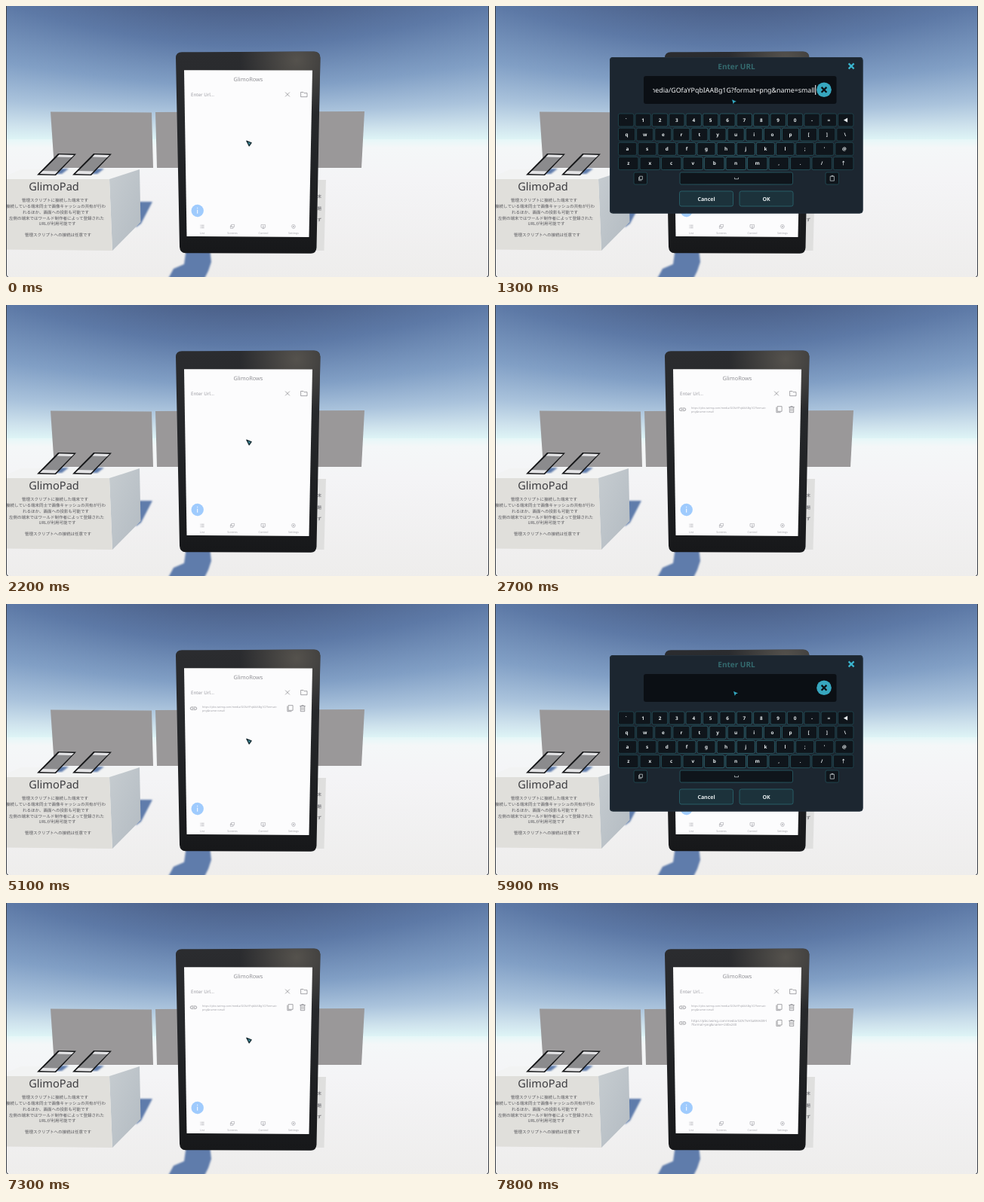
An HTML page that plays this animation: 640x360 px, repeating every 8000 ms.

```html
<!DOCTYPE html>
<html lang="ja">
<head>
<meta charset="utf-8">
<title>Tablet URL entry</title>
<style>
html, body { margin: 0; width: 100%; height: 100%; overflow: hidden; background: #eef0f4; }
svg { display: block; width: 100vw; height: 100vh; }
text { font-family: "Noto Sans", "Noto Sans CJK JP", "Noto Sans CJK", "Open Sans", sans-serif; text-rendering: geometricPrecision; }
.mid { text-anchor: middle; }
.bold { font-weight: 700; fill: #e8eef0; }
.line { fill: none; stroke: #77777c; stroke-width: .65; stroke-linejoin: round; stroke-linecap: round; }
.faint { stroke: #a2a2a8; stroke-width: .6; }
.key { fill: #0f151b; stroke: url(#edge); stroke-width: .9; }
.key.hover { fill: #17232b; stroke: #8cbcc4; }
.btn { fill: #1c323b; stroke: #2a626d; stroke-width: .9; }
.btn.hover { fill: #315a67; stroke: #47808c; }
</style>
</head>
<body>
<svg viewBox="0 0 640 360" preserveAspectRatio="none">
  <defs>
    <linearGradient id="sky" x2="0" y2="1">
      <stop offset="0" stop-color="#4b6089"/>
      <stop offset=".3" stop-color="#5d79a6"/>
      <stop offset=".6" stop-color="#819fc5"/>
      <stop offset=".8" stop-color="#aac3dc"/>
      <stop offset=".93" stop-color="#cfe3ed"/>
      <stop offset="1" stop-color="#def4f6"/>
    </linearGradient>
    <linearGradient id="ground" x2="0" y2="1">
      <stop offset="0" stop-color="#e6f7f8"/>
      <stop offset=".06" stop-color="#f4f7f8"/>
      <stop offset=".3" stop-color="#f4f4f6"/>
      <stop offset="1" stop-color="#eeedec"/>
    </linearGradient>
    <linearGradient id="body" x2="0" y2="1">
      <stop offset="0" stop-color="#2b2c2f"/>
      <stop offset=".4" stop-color="#25272a"/>
      <stop offset="1" stop-color="#17181a"/>
    </linearGradient>
    <radialGradient id="gloss" gradientUnits="userSpaceOnUse" cx="385" cy="72" r="75">
      <stop offset="0" stop-color="#55524d"/>
      <stop offset="1" stop-color="#55524d" stop-opacity="0"/>
    </radialGradient>
    <linearGradient id="side" x2="1" y2="1">
      <stop offset="0" stop-color="#c6ccd0"/>
      <stop offset="1" stop-color="#b3bbc2"/>
    </linearGradient>
    <radialGradient id="edge" gradientUnits="userSpaceOnUse" cx="322" cy="200" r="150">
      <stop offset="0" stop-color="#2f6b76"/>
      <stop offset="1" stop-color="#1d424b"/>
    </radialGradient>
    <filter id="soft"><feGaussianBlur stdDeviation="1"/></filter>
    <clipPath id="field"><rect x="209" y="98" width="217" height="26"/></clipPath>
  </defs>
  <g id="world"></g>
  <g id="rows"></g>
  <g id="dialog"></g>
  <g id="tip">
    <rect x="118" y="330" width="403.5" height="16.5" rx="3" fill="#4d4d50" opacity=".95"/>
    <text x="122" y="340.8" font-size="6.6" class="bold">Submit Input</text>
  </g>
  <g id="cursor"><path stroke-linejoin="round"/></g>
  <path d="M.5 0V357Q.5 359.5 3 360M639.5 0V357Q639.5 359.5 637 360" fill="none" stroke="#3a3f48"/>
</svg>
<script>
const $ = id => document.getElementById(id);
const poly = (points, fill, more = '') => `<polygon points="${points}" fill="${fill}" ${more}/>`;
const rect = (x, y, w, h, more = '') => `<rect x="${x}" y="${y}" width="${w}" height="${h}" ${more}/>`;
const esc = s => s.replace(/&/g, '&amp;').replace(/</g, '&lt;');
const text = (s, x, y, size, fill, cls = '') =>
  `<text x="${x}" y="${y}" font-size="${size}" ${fill ? `fill="${fill}"` : ''} class="${cls}">${esc(s)}</text>`;
const icon = (d, x, y, cls = '', more = '') => `<path class="line ${cls}" d="${d}" transform="translate(${x} ${y})" ${more}/>`;

const ICON = {
  cross: 'M-2.6-2.6L2.6 2.6M2.6-2.6L-2.6 2.6',
  folder: 'M-4-3h3l1 1.2h4V3.2h-8z',
  link: 'M-.6-1.8h-1.8a1.8 1.8 0 0 0 0 3.6h1.8M.6-1.8h1.8a1.8 1.8 0 0 1 0 3.6h-1.8M-1.7 0h3.4',
  copy: 'M-2-4h5.6v6.6h-5.6zM-3.6-2.6v6.6h5.2',
  bin: 'M-3.4-3h6.8M-1.2-3v-1h2.4v1M-2.7-3v7h5.4v-7M-1-1.2v3.4M1-1.2v3.4',
  list: 'M-.8-1.8h3M-.8 0h3M-.8 1.8h3M-2.2-1.8h.2M-2.2 0h.2M-2.2 1.8h.2',
  screens: 'M-1-2.6h3.6v3h-3.6zM-2.6-.8v3.2h3.6v-2M-2.6-.8h1.6',
  control: 'M-2.6-2.4h5.2v3.6h-5.2zM-1.2 2.6h2.4M0 1.2v1.4M-.6-.6h1.2',
  gear: 'M-1.2-2.3h2.4L2.5 0 1.2 2.3h-2.4L-2.5 0zM-.8 0a.8.8 0 1 0 1.6 0a.8.8 0 1 0-1.6 0',
  board: 'M-2.4-2.8h4.8v6h-4.8zM-1-2.8v-.8h2v.8',
  pages: 'M-1-2.8h3.4v4.2h-3.4zM-2.4-1.4v4.2h3.4'
};

// Lines of equal elevation rise towards the sides of a perspective view.
function skyStrips() {
  const focal = 312, horizon = 177, step = 5;
  let out = '';
  for (let x = 0; x < 640; x += step) {
    const h = horizon * Math.hypot(1, (x + step / 2 - 320) / focal);
    out += rect(x, horizon - h, step, h, 'fill="url(#sky)"');
  }
  return out;
}

function drawWorld() {
  const shadow = points => poly(points, '#5f7cab', 'filter="url(#soft)"');
  const phone = x => shadow(`${x + 24},216 ${x + 42},216 ${x + 33},223 ${x + 17},223`) +
    poly(`${x + 28},196 ${x + 52},196.5 ${x + 25},225 ${x},224.5`, '#151618') +
    poly(`${x + 29.5},197.5 ${x + 49},198 ${x + 24},223.5 ${x + 4},223`, '#8b8b8d') +
    poly(`${x + 29.5},197.5 ${x + 49},198 ${x + 46},201 ${x + 26.5},200.5`, '#e4e4e6') +
    poly(`${x + 8},219 ${x + 28},219.5 ${x + 24},223.5 ${x + 4},223`, '#e4e4e6');
  const notes = [
    ['管理スクリプトに接続した端末です', 65, 260],
    ['接続している端末同士で画像キャッシュの共有が行わ', 66, 268],
    ['れるほか、画面への投影も可能です', 66, 276],
    ['左側の端末ではワールド制作者によって登録された', 67, 284],
    ['URLが利用可能です', 68, 291.3],
    ['管理スクリプトへの接続は任意です', 69, 306.3]
  ];
  const tabs = [['List', 260, 'list'], ['Screens', 300, 'screens'], ['Control', 341, 'control'], ['Settings', 381, 'gear']];
  const shell = 'd="M233 61.3L408 60.5Q416.5 60.5 416.5 69L411.5 321Q411 328.8 404 328.8L238 328.3Q230.5 328 230 320L225 69Q225 61.3 233 61.3Z"';
  $('world').innerHTML =
    skyStrips() +
    rect(0, 177, 640, 183, 'fill="url(#ground)"') +
    // wall panels
    poly('59,140.5 193,141.5 195,215 64,215', '#9a9899') +
    poly('198,141 475,140 471,215 200,215', '#9a9899') +
    // pedestal and its shadow
    shadow('172,260 194,260 179,289 172,294') +
    poly('-10,230 137,230 177,217 20,217', '#f2f3f3') +
    poly('137,230 177,217 178.5,287 141,325', 'url(#side)') +
    poly('-10,230 137,230 141,325 -10,323.5', '#e0dfdb') +
    phone(41) + phone(88) +
    text('GlimoPad', 63.5, 245, 14.6, '#3c3c40', 'mid') +
    notes.map(([s, x, y]) => text(s, x, y, 5.5, '#55555a', 'mid')).join('') +
    // right-hand sign
    poly('405,231 424,231 421.5,325 405,325', '#dfdfde') +
    ['末', '題', 'ず'].map((s, i) => text(s, 412.5, [255, 271, 285.5][i], 5.5, '#55555a')).join('') +
    // tablet
    shadow('239,322 270,322 272,340 268,352 263,362 215,362 222,349 236,343') +
    `<path fill="url(#body)" ${shell}/><path fill="url(#gloss)" ${shell}/>` +
    poly('236,85.3 406,85.5 401.5,307 239.5,306', '#fcfcfd') +
    text('GlimoRows', 321, 99.5, 7.4, '#929297', 'mid') +
    text('Enter Url...', 245, 120, 6.2, '#9c9ca2') +
    icon(ICON.cross, 373, 117.5) + icon(ICON.folder, 395, 117.5) +
    '<circle cx="253.7" cy="272" r="8.2" fill="#9fcbfd"/>' +
    '<path d="M253.7 271v4.3M253.7 268.2v.5" stroke="#fff" stroke-width="1" stroke-linecap="round"/>' +
    tabs.map(([s, x, name]) => icon(ICON[name], x, 293, 'faint') + text(s, x, 302.5, 3.7, '#a8a8ae', 'mid')).join('');
}

function drawRows() {
  const row = (y, size, a, b) => '<g>' + icon(ICON.link, 248.5, y) +
    text(a, 260, y - 1.2, size, '#a2a2a8') + text(b, 260, y + 3.9, size, '#a2a2a8') +
    icon(ICON.copy, 376.5, y) + icon(ICON.bin, 393, y) + '</g>';
  $('rows').innerHTML =
    row(138.7, 3.6, 'https://pbs.twimg.com/media/GOfaYPqbIAABg1G?format=', 'png&name=small') +
    row(159.5, 4.3, 'https://pbs.twimg.com/media/GOV7vHSa8AA4W-l', '?format=png&name=240x240');
}

const keyRows = ['`1234567890-=◀', 'qwertyuiop[]\\', "asdfghjkl;'@", 'zxcvbnm,./↑'];
const targets = [];

function drawDialog() {
  const key = (x, y, w, h, inner) => {
    targets.push({ x, y, w, h });
    return `<g class="target">${rect(x, y, w, h, 'rx="2" class="key"')}${inner}</g>`;
  };
  const button = (x, label) => {
    targets.push({ x, y: 246, w: 71, h: 20 });
    return `<g class="target">${rect(x, 246, 71, 20, 'rx="2.5" class="btn"')}${text(label, x + 35.5, 258.6, 7, '', 'mid bold')}</g>`;
  };
  const keys = keyRows.map((chars, r) => {
    const list = [...chars], step = 313.4 / list.length, y = 143 + r * 19.2;
    return list.map((c, i) => {
      const x = 163.5 + i * step;
      return key(x, y, step - 2, 17, text(c, x + step / 2 - 1, y + 10.8, 6.4, '', 'mid bold'));
    }).join('');
  }).join('');
  const pale = 'style="stroke:#dfe8ea"';
  $('dialog').innerHTML =
    rect(152, 68, 335.5, 207.5, 'rx="4" fill="#1c2630"') +
    rect(152.5, 68.5, 334.5, 206.5, 'rx="4" fill="none" stroke="#232f3a"') +
    '<text x="320" y="83.6" font-size="10" font-weight="700" fill="#346a6e" class="mid">Enter URL</text>' +
    '<path d="M468.6 76.4l7 7m0-7l-7 7" stroke="#3ab4cd" stroke-width="2.2"/>' +
    rect(197, 93, 255.5, 37, 'rx="3" fill="#0b0f14"') +
    '<g clip-path="url(#field)"><text id="entry" x="423.8" y="115" font-size="8.85" text-anchor="end" fill="#f4f6f7"></text></g>' +
    rect(424.2, 105, 1, 13, 'id="caret" fill="#fff"') +
    '<circle cx="436" cy="111.3" r="9.8" fill="#37a7bf"/>' +
    '<path d="M432.6 107.9l6.8 6.8m0-6.8l-6.8 6.8" stroke="#0b1116" stroke-width="2.3"/>' +
    keys +
    key(184, 221, 17.5, 16, icon(ICON.pages, 193, 229, '', pale)) +
    key(245, 221, 149.5, 16, icon('M-2.5-.8v1.6h5v-1.6', 320, 229, '', pale)) +
    key(438, 221, 17.5, 16, icon(ICON.board, 447, 229, '', pale)) +
    button(244.5, 'Cancel') + button(324, 'OK');
}

drawWorld();
drawRows();
drawDialog();

const rows = $('rows').children;
const groups = [...document.querySelectorAll('.target')];
const okIndex = targets.length - 1;
const arrow = $('cursor').firstChild;

const sessions = [
  { open: 400, paste: 1100, close: 2200, row: 2300,
    path: [[400, 319, 179], [900, 314, 119], [1300, 314, 124.3], [1500, 320, 150], [1900, 348, 250], [2000, 349, 252.8]],
    url: 'https://pbs.twimg.com/media/GOfaYPqbIAABg1G?format=png&name=small' },
  { open: 5300, paste: 6200, close: 7300, row: 7400,
    path: [[5300, 319, 179], [5900, 316, 116], [6300, 318, 124], [6600, 342, 215.3], [6900, 349, 251], [7000, 350, 253]],
    url: 'https://pbs.twimg.com/media/GOV7vHSa8AA4W-l?format=png&name=240x240' }
];

function along(path, t) {
  let i = 0;
  while (i < path.length - 2 && t >= path[i + 1][0]) i++;
  const [t0, x0, y0] = path[i], [t1, x1, y1] = path[i + 1];
  const k = Math.min(1, Math.max(0, (t - t0) / (t1 - t0)));
  return [x0 + (x1 - x0) * k, y0 + (y1 - y0) * k];
}

function worldCursor(t) {
  if (t >= 2600 && t < 2700) return [511, 231, 1];
  if (t < 200 || t >= 5100 && t < 7800 || t >= 2200 && t < 2600) return [318, 178.3, 1];
  return t < 400 ? [318, 178.3, .9] : null;
}

const show = (el, on) => el.setAttribute('visibility', on ? 'inherit' : 'hidden');

function setHover(at) {
  targets.forEach(({ x, y, w, h }, i) => {
    const on = at && at[0] >= x && at[0] <= x + w && at[1] >= y && at[1] <= y + h;
    groups[i].firstChild.classList.toggle('hover', !!on);
    if (i === okIndex) {
      groups[i].setAttribute('transform', on ? 'translate(360 257) scale(1.03) translate(-359.5 -256)' : '');
      show($('tip'), on);
    }
  });
}

function render(ms) {
  const t = Math.floor(ms / 100) * 100;
  const s = sessions.find(s => t >= s.open && t < s.close);
  sessions.forEach((s, i) => show(rows[i], t >= s.row));
  show($('dialog'), s);
  const at = s ? along(s.path, t) : null;
  setHover(at);
  if (s) $('entry').textContent = t >= s.paste ? s.url : '';
  show($('caret'), s && (t - s.paste + 1000) % 1000 < 500);
  const spot = s ? [...at, 1] : worldCursor(t);
  show($('cursor'), spot);
  if (!spot) return;
  const [x, y, scale] = spot;
  $('cursor').setAttribute('transform', `translate(${x} ${y}) scale(${scale})`);
  arrow.setAttribute('d', s ? 'M0 0L6 2.6 3.2 3.5 1.8 6Z' : 'M.8.9L7.2 3.4 4.2 7.6Z');
  arrow.setAttribute('fill', s ? '#33a9c2' : '#38808f');
  arrow.setAttribute('stroke', s ? 'none' : '#14272e');
  arrow.setAttribute('stroke-width', 1.2);
}

function tick(now) {
  render(now % 8000);
  requestAnimationFrame(tick);
}
render(0);
requestAnimationFrame(tick);
</script>
</body>
</html>
```
